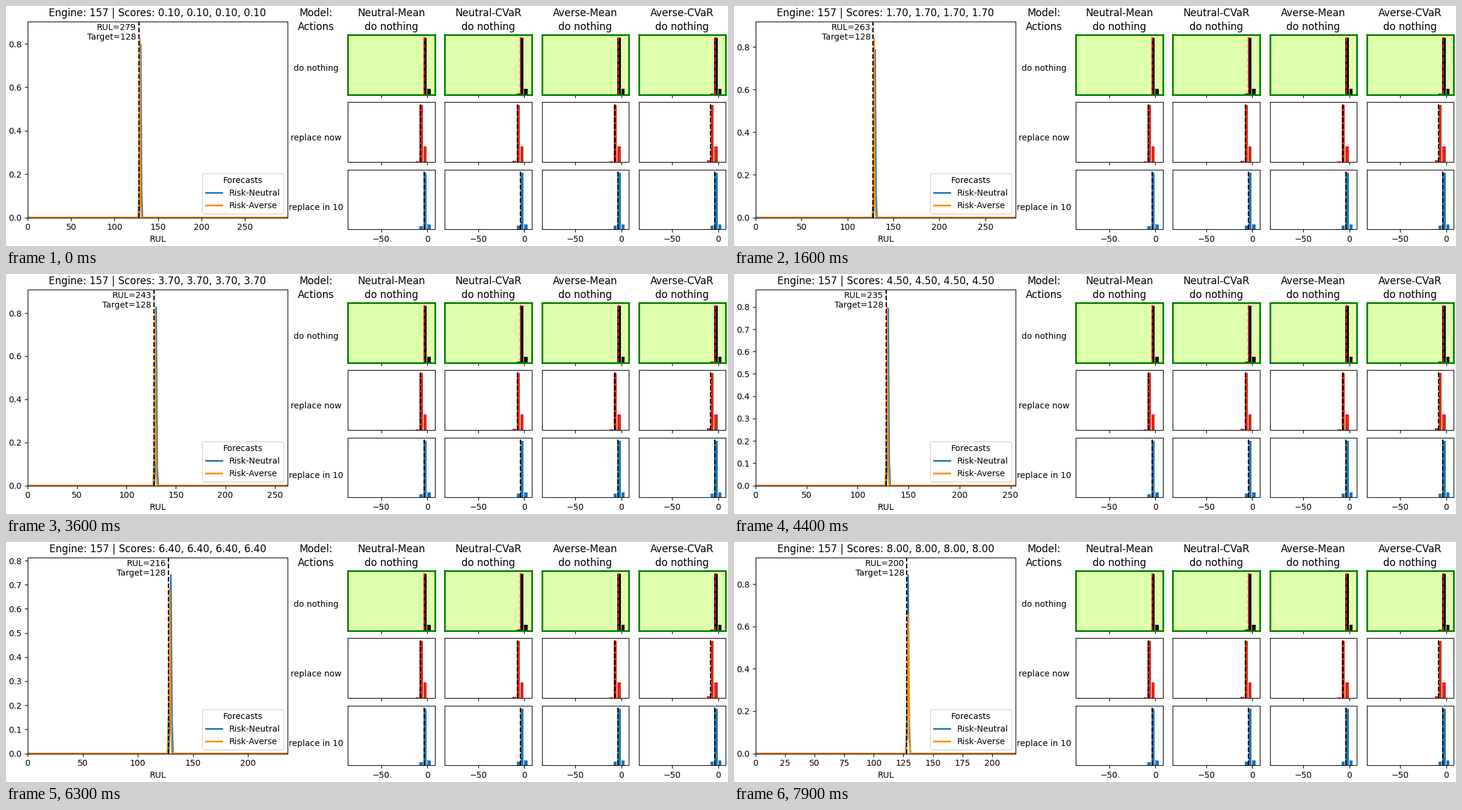
These frames come from a looping animation (1200x400 px, 8 s). A matplotlib script:

```python
import numpy as np
import matplotlib.pyplot as plt
from matplotlib.animation import FuncAnimation

W, H, DPI = 1200, 400, 100
FRAMES, INTERVAL = 80, 100
TARGET, START_RUL = 128, 279

BLUE, ORANGE, RED = "#1f77b4", "#ff8c00", "#dd2a16"
GREEN, PALE_GREEN = "#008000", "#deffac"

# Forecast peaks at a few moments, interpolated in between
KEYS = [0, 16, 27, 44, 53, 63, 79]
NEUTRAL_PEAK = [.797, .787, .866, .793, .722, .740, .842]
NEUTRAL_AT = [130, 130, 129, 130, 130, 130, 129]
AVERSE_PEAK = [.8215, .837, .794, .799, .7275, .682, .656]
AVERSE_AT = 129

MODELS = ["Neutral-Mean", "Neutral-CVaR", "Averse-Mean", "Averse-CVaR"]
BIN, BAR = 4.2, 3.5
# Per action: label, colour, first bin, mean line per model,
# height left of the main bar per model, height right of it
ACTIONS = [
    ("do nothing", "black", -2, [-3.3, -4.05, -3.0, -3.5], [0, .02, 0, .017], .10),
    ("replace now", RED, -3, [-7.2, -7.8, -7.2, -8.3], [.01, .022, .008, .03], .275),
    ("replace in 10", BLUE, -2, [-3.6, -4.1, -3.6, -3.8], [.055, .065, .065, .068], .085),
]

plt.rcParams.update({"font.family": "DejaVu Sans", "font.size": 10})
fig = plt.figure(figsize=(W / DPI, H / DPI), dpi=DPI, facecolor="white")


def add_axes(left, top, width, height):
    """Axes placed in pixels from the top left corner."""
    return fig.add_axes([left / W, 1 - (top + height) / H, width / W, height / H])


def label(x, y, text, size=12, va="baseline"):
    fig.text(x / W, 1 - y / H, text, fontsize=size, ha="center", va=va)


def draw_panel(row, col):
    _, color, first, means, before, after = ACTIONS[row]
    ax = add_axes(568.2 + 161.2 * col, 48 + 112.4 * row, 144.5, 99.5)
    lefts = [BIN * (first + k) for k in range(3)]
    ax.bar(lefts, [before[col], 1, after], BAR, align="edge", color=color)
    chosen = row == 0
    ax.axvline(means[col], color="red" if chosen else "black", ls="--", lw=1.5)
    ax.set(xlim=(-86.1, 8.1), ylim=(0, 1.05), xticks=[-50, 0], yticks=[])
    ax.tick_params(labelbottom=row == 2)
    if chosen:
        ax.set_facecolor(PALE_GREEN)
        for spine in ax.spines.values():
            spine.set(color=GREEN, linewidth=2)


label(515, 17, "Model:")
label(515, 40, "Actions")
for col, model in enumerate(MODELS):
    x = 640.4 + 161.2 * col
    label(x, 17, model)
    label(x, 40, "do nothing")
    for row in range(3):
        draw_panel(row, col)
for row, action in enumerate(ACTIONS):
    label(515, 104 + 116 * row, action[0], 10, "center")

main = add_axes(36, 25.5, 432, 327)
main.set_xlabel("RUL")
title = main.set_title("")
neutral, = main.plot([], [], color=BLUE, lw=2, label="Risk-Neutral")
averse, = main.plot([], [], color=ORANGE, lw=2, label="Risk-Averse")
main.axvline(TARGET, color="black", ls="--", lw=1.5)
note = main.annotate("", (TARGET, 1), xycoords=main.get_xaxis_transform(),
                     xytext=(-3.2, -2.4), textcoords="offset points",
                     ha="right", va="top")
main.legend(title="Forecasts", loc="lower right")


def forecast(x, center, peak):
    """Narrow distribution over whole cycles that sums to one."""
    off = np.abs(x - center)
    return np.where(off == 0, peak, np.where(off == 1, (1 - peak) / 2, 0))


def update(i):
    rul = START_RUL - i
    end = rul + 20
    x = np.arange(end + 1)
    n_peak = np.interp(i, KEYS, NEUTRAL_PEAK)
    a_peak = np.interp(i, KEYS, AVERSE_PEAK)
    n_at = round(np.interp(i, KEYS, NEUTRAL_AT))
    neutral.set_data(x, forecast(x, n_at, n_peak))
    averse.set_data(x, forecast(x, AVERSE_AT, a_peak))
    main.set_xlim(0, end)
    main.set_ylim(0, 1.1 * max(n_peak, a_peak))
    score = f"{(i + 1) / 10:.2f}"
    title.set_text("Engine: 157 | Scores: " + ", ".join([score] * 4))
    note.set_text(f"RUL={rul}\nTarget={TARGET}")
    return neutral, averse, title, note


anim = FuncAnimation(fig, update, frames=FRAMES, interval=INTERVAL,
                     repeat=True, repeat_delay=0, blit=False)
plt.show()
```
